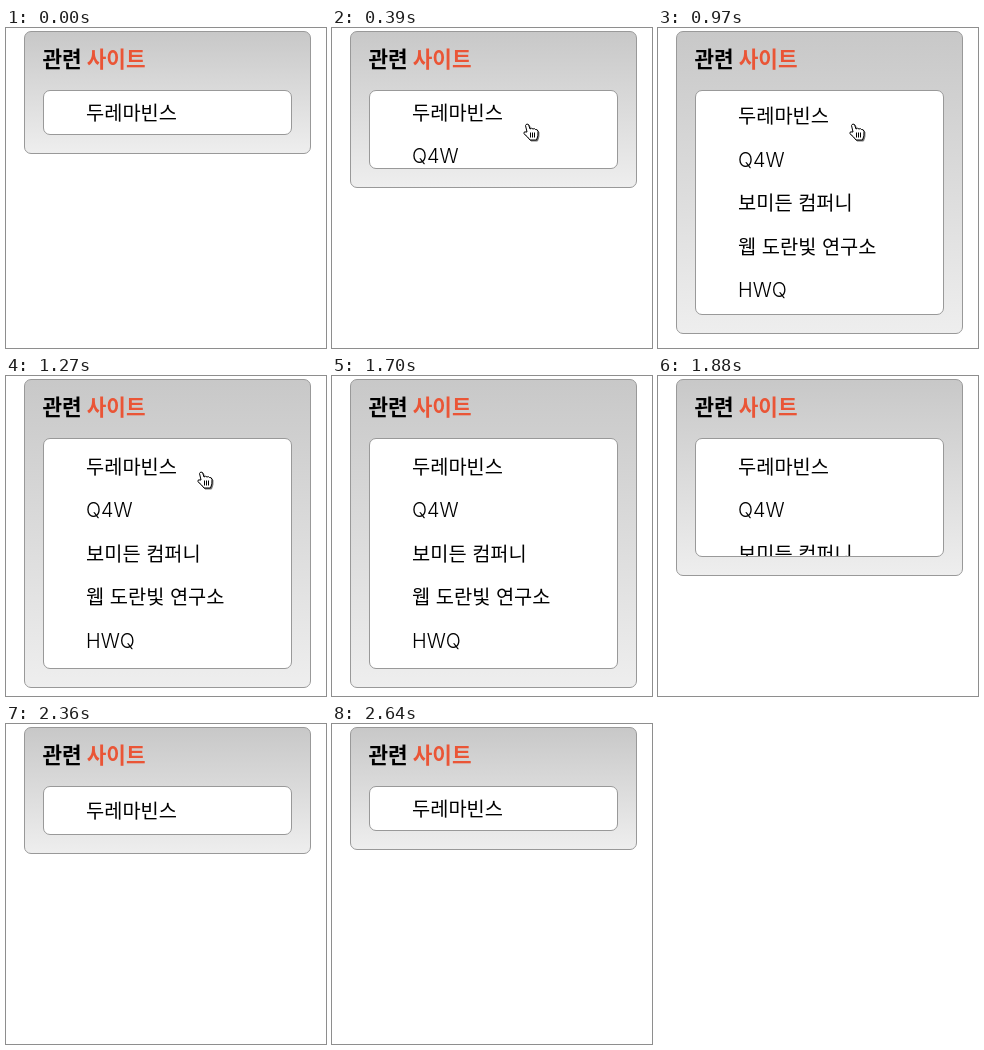
Animation, 320 px wide and 320 px high, one loop 2790 ms. Source, as an HTML page:

```html
<!DOCTYPE html>
<html lang="ko">
<head>
<meta charset="utf-8">
<style>
  html, body { margin: 0; height: 100%; overflow: hidden; background: #fff; }
  body { position: relative; color: #000; font: 300 19.8px/43.5px Inter, "Noto Sans CJK KR", sans-serif; white-space: nowrap; }
  #panel, #list { position: absolute; box-sizing: border-box; border: 1px solid #999; border-radius: 7px; }
  #panel { left: 18px; top: 3px; width: 287px; background: linear-gradient(#c8c8c8, #eee); }
  #list { left: 37px; top: 62px; width: 249px; margin: 0; padding: 0 0 0 42px; background: #fff; list-style: none; overflow: hidden; }
  li { position: relative; top: .6px; }
  h2 { position: absolute; left: 36.5px; top: 15px; margin: 0; font-size: 21.3px; line-height: 32px; font-weight: 700; }
  h2 span { color: #ea5536; }
  #hand { position: absolute; left: 0; top: 0; overflow: visible; filter: drop-shadow(1px 1px .6px #0008); }
</style>
</head>
<body>
<div id="panel"></div>
<h2>관련 <span>사이트</span></h2>
<ul id="list">
  <li>두레마빈스</li>
  <li>Q4W</li>
  <li>보미든 컴퍼니</li>
  <li>웹 도란빛 연구소</li>
  <li>HWQ</li>
</ul>
<svg id="hand" width="17" height="19" fill="#fff" stroke="#000">
  <path d="M2.5 2.5Q3.5 0 5.5 1.5L7 6Q8.5 4.5 10 6Q11.5 5 12.5 6.5Q14.5 6 15 8.5Q15.5 13 13.5 17H7Q5 14 .8 10.5Q.5 8 4 9Z"/>
  <path d="M7.5 9.5v5M9.5 9.5v5M11.5 9.5v5"/>
</svg>
<script>
  const LOOP = 2790;
  const [panel, list, hand] = ['panel', 'list', 'hand'].map(id => document.getElementById(id));
  const ramp = (t, start, length) => Math.min(1, Math.max(0, (t - start) / length));

  // CSS "ease": cubic-bezier(.25, .1, .25, 1)
  function ease(x) {
    let lo = 0, hi = 1;
    for (let i = 0; i < 24; i++) {
      const s = (lo + hi) / 2;
      if (0.75 * s * (1 - s) + s ** 3 < x) lo = s; else hi = s;
    }
    return 0.3 * lo * (1 - lo) ** 2 + 3 * lo * lo * (1 - lo) + lo ** 3;
  }
  const eased = (t, start, length) => ease(ramp(t, start, length));

  function draw(t) {
    // the height opens first, then the padding; closing follows the same order
    const open = eased(t, 313, 500) - eased(t, 1715, 440);
    const padding = 6.4 * (eased(t, 813, 500) - eased(t, 2155, 500));
    const height = Math.round(45 + 173.4 * open + 2 * padding);
    list.style.height = height + 'px';
    list.style.paddingTop = padding + 'px';
    panel.style.height = height + 78 + 'px';

    const enter = ramp(t, 295, 85), leave = ramp(t, 1580, 120);
    const x = 191 + 130 * (1 - enter) + 100 * leave;
    const y = 95 + 25 * (1 - enter) + 15 * leave;
    hand.style.transform = `translate(${x}px, ${y}px)`;
    hand.style.visibility = enter > 0 && leave < 1 ? 'visible' : 'hidden';
  }

  const begin = performance.now();
  function tick() {
    draw((performance.now() - begin) % LOOP);
    requestAnimationFrame(tick);
  }
  draw(0);
  requestAnimationFrame(tick);
</script>
</body>
</html>
```
